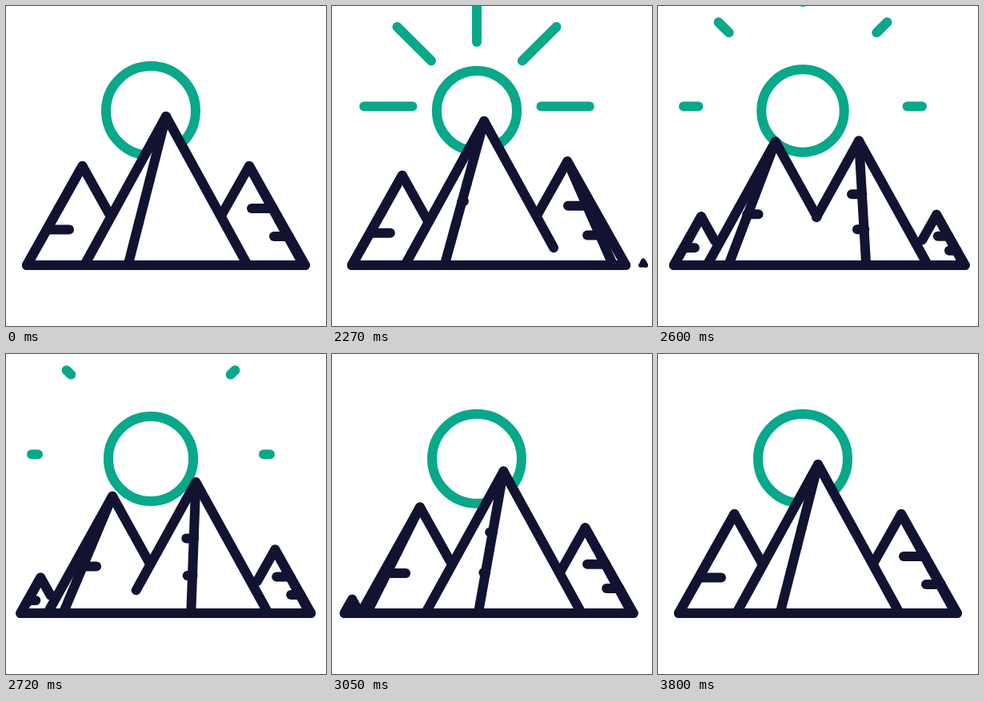
These frames come from a looping animation (400 px wide and 400 px high, 3.83 s). An HTML page with a canvas:

```html
<!DOCTYPE html>
<html lang="en">
<head>
<meta charset="utf-8">
<title>Mountains</title>
<style>
  html, body { margin: 0; width: 100%; height: 100%; overflow: hidden; background: #fff; }
  canvas { display: block; width: 400px; height: 400px; }
</style>
</head>
<body>
<canvas id="stage"></canvas>
<script>
const NAVY = '#121331', GREEN = '#08a88a';
const LOOP = 3830, REST = 2000, STEP = 30;
const GROUND = 324, WIDTH = 12;

const canvas = document.getElementById('stage');
const ctx = canvas.getContext('2d');
const ratio = window.devicePixelRatio || 1;
canvas.width = canvas.height = 400 * ratio;

const clamp = v => Math.max(0, Math.min(1, v));
const span = (x, a, b) => clamp((x - a) / (b - a));
const mix = (a, b, p) => a + (b - a) * p;
const smooth = u => u * u * (3 - 2 * u);

// cubic-bezier(.33, 0, .2, 1)
function ease(x) {
  if (x <= 0) return 0;
  if (x >= 1) return 1;
  let lo = 0, hi = 1;
  for (let i = 0; i < 24; i++) {
    const t = (lo + hi) / 2, s = 1 - t;
    if (3 * s * s * t * 0.33 + 3 * s * t * t * 0.2 + t * t * t < x) lo = t;
    else hi = t;
  }
  return lo * lo * (3 - 2 * lo);
}

// A pose: peak x, peak y, left foot, right foot, ridge foot, then three notches (x1, x2, y).
// A notch given as a single fraction is hidden on the ridge at that depth.
function pose(px, py, left, right, ridge, ...notches) {
  const hide = f => [mix(px, ridge, f), mix(px, ridge, f), mix(py, GROUND, f)];
  return [px, py, left, right, ridge, ...notches.flatMap(n => Array.isArray(n) ? n : hide(n))];
}

const speck = x => pose(x, GROUND, x, x, x, 0, 0, 0);
const POSES = [
  speck(394),
  pose(304, 200, 234, 374, 372, [307, 334, 253], [335, 354, 288], 0.55),
  pose(200, 138, 98, 302, 152.5, 0.43, 0.715, 0.55),
  pose(95.5, 200, 26, 165, 26, 0.43, 0.715, [51, 79, 279.5]),
  speck(14)
];

function line(x1, y1, x2, y2) {
  ctx.beginPath();
  ctx.moveTo(x1, y1);
  ctx.lineTo(x2, y2);
  ctx.stroke();
}

function sun(x) {
  const shrink = x < 0.16 ? smooth(x / 0.16) : 1 - smooth(span(x, 0.18, 0.6));
  ctx.strokeStyle = GREEN;
  ctx.beginPath();
  ctx.arc(181, 131, 56 - 6 * shrink, 0, Math.PI * 2);
  ctx.stroke();

  if (x <= 0 || x >= 0.52) return;
  const u = span(x, 0, 0.2), v = span(x, 0.15, 0.52);
  const from = mix(80.5, 149, 1 - (1 - v) ** 2);
  const to = mix(80.5, 149, u + u * u - u * u * u);
  for (let i = 0; i < 5; i++) {
    const a = Math.PI * (1 + i / 4), c = Math.cos(a), s = Math.sin(a);
    line(181 + from * c, 125.5 + from * s, 181 + to * c, 125.5 + to * s);
  }
}

function cover([px, py, left, right]) {
  ctx.beginPath();
  ctx.moveTo(px, py);
  ctx.lineTo(left, GROUND);
  ctx.lineTo(right, GROUND);
  ctx.fill();
}

// cutL and cutR tell how much of each slope is drawn
function mountain([px, py, left, right, ridge, ...notches], cutL, cutR, size, anchor) {
  if (size <= 0) return;
  ctx.save();
  ctx.translate(anchor, GROUND);
  ctx.scale(size, size);
  ctx.translate(-anchor, -GROUND);
  ctx.beginPath();
  ctx.moveTo(mix(px, left, cutL), mix(py, GROUND, cutL));
  ctx.lineTo(px, py);
  ctx.lineTo(mix(px, right, cutR), mix(py, GROUND, cutR));
  ctx.stroke();
  line(left, GROUND, right, GROUND);
  line(px, py, ridge, GROUND);
  for (let i = 0; i < 9; i += 3) {
    line(notches[i], notches[i + 2], notches[i + 1], notches[i + 2]);
  }
  ctx.restore();
}

function draw(time) {
  const t = time % LOOP;
  const x = Math.max(0, Math.floor((t - REST) / STEP) * STEP) / (LOOP - REST);
  const p = ease(x);

  ctx.setTransform(ratio, 0, 0, ratio, 0, 0);
  ctx.fillStyle = '#fff';
  ctx.fillRect(0, 0, 400, 400);
  ctx.lineWidth = WIDTH;
  ctx.lineCap = ctx.lineJoin = 'round';
  sun(x);

  const [fresh, right, middle, left] = [0, 1, 2, 3].map(
    i => POSES[i].map((v, k) => mix(v, POSES[i + 1][k], p)));
  [right, middle, left].forEach(cover);

  ctx.strokeStyle = NAVY;
  mountain(left, 1, 0.5, clamp((0.98 - x) / 0.38), left[2]);
  mountain(middle, 1, 1 - 0.5 * ease(x * 1.5), 1, 0);
  mountain(right, 0.5 + 0.5 * ease(span(x, 0.25, 0.61)), 1, 1, 0);
  mountain(fresh, 0.5, 1, clamp(x * 3.2), fresh[3]);
}

const start = performance.now();
function tick() {
  draw(performance.now() - start);
  requestAnimationFrame(tick);
}
tick();
</script>
</body>
</html>
```
